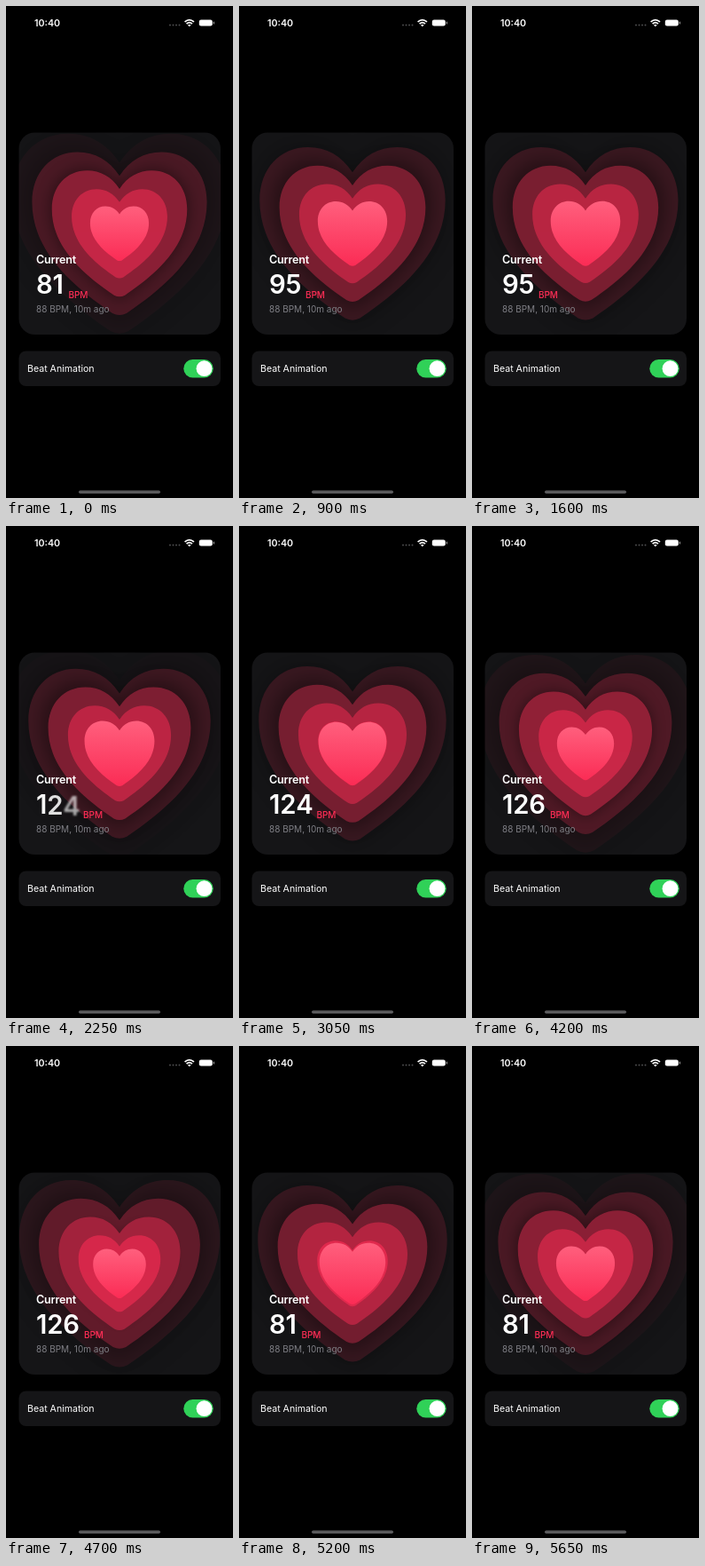
An HTML page for the animation above (5.7 s loop, 256 px wide and 554 px high).

```html
<!DOCTYPE html>
<html lang="en">
<head>
<meta charset="utf-8">
<title>Heart rate</title>
<style>
  html, body { margin: 0; width: 100%; height: 100%; overflow: hidden; background: #000; }
  svg { position: absolute; left: 0; top: 0; }
  text, .num { font-family: Inter, Roboto, sans-serif; fill: #fff; }
  .num { position: absolute; left: 34px; top: 296px; font-size: 29.3px; font-weight: 600;
         line-height: 36px; letter-spacing: -.2px; color: #fff; white-space: nowrap; }
  .num span { display: inline-block; }
</style>
</head>
<body>
<svg width="256" height="554" viewBox="0 0 256 554">
  <defs>
    <path id="heart" d="M0-33C-6-42-14-46.5-24-46.5C-39-46.5-50-35-50-18C-50 8-30 28-4 45.5Q0 47.5 4 45.5C30 28 50 8 50-18C50-35 39-46.5 24-46.5C14-46.5 6-42 0-33Z"/>
    <linearGradient id="pink" x2="0" y2="1">
      <stop stop-color="#ff5f7d"/><stop offset="1" stop-color="#fb2c55"/>
    </linearGradient>
    <filter id="blur" x="-30%" y="-30%" width="160%" height="160%">
      <feGaussianBlur stdDeviation="5"/>
    </filter>
    <clipPath id="card"><rect x="14.5" y="142.5" width="227.5" height="227.5" rx="18"/></clipPath>
  </defs>

  <text x="32" y="23" font-size="10.7" font-weight="600">10:40</text>
  <g fill="#4c4c4e">
    <circle cx="185" cy="21.6" r="1"/><circle cx="188.5" cy="21.6" r="1"/>
    <circle cx="192" cy="21.6" r="1"/><circle cx="195.5" cy="21.6" r="1"/>
  </g>
  <g fill="none" stroke="#fff" stroke-width="1.7">
    <path d="M201.6 17.9Q206.8 13.2 212 17.9M203.6 20Q206.8 17.2 210 20"/>
    <path d="M205 21.4Q206.8 20 208.6 21.4L206.8 23.2Z" fill="#fff" stroke="none"/>
  </g>
  <rect x="217.8" y="15.5" width="15" height="7" rx="2.2" fill="#fff"/>
  <rect x="233.8" y="17.6" width="1.2" height="2.8" rx=".6" fill="#999"/>

  <g fill="#151517">
    <rect x="14.5" y="142.5" width="227.5" height="227.5" rx="18"/>
    <rect x="14.5" y="388.5" width="227.5" height="39.5" rx="8"/>
  </g>
  <g clip-path="url(#card)">
    <g id="rings"></g>
    <use id="core" href="#heart" fill="url(#pink)"/>
  </g>

  <text x="34" y="290" font-size="12.6" font-weight="600" letter-spacing="-.2">Current</text>
  <text id="bpm" y="329" font-size="10" font-weight="500" letter-spacing="-.1" style="fill:#ff2d55">BPM</text>
  <text x="34" y="345" font-size="10" style="fill:#7f7f85">88 BPM, 10m ago</text>

  <text x="24" y="412" font-size="10.6">Beat Animation</text>
  <rect x="200.3" y="398" width="33.4" height="20.4" rx="10.2" fill="#30d158"/>
  <circle cx="223.5" cy="408.2" r="8.9" fill="#fff"/>
  <rect x="82" y="545.5" width="92" height="3.4" rx="1.7" fill="#5a5a5c"/>
</svg>
<div class="num" id="old"></div>
<div class="num" id="now"></div>

<script>
const $ = id => document.getElementById(id);
const LOOP = 5.7, BEAT = 5.65 / 8, LIFE = 3, WIDTH = 63.2;
const values = ['81', '95', '124', '126', '81'];
const bpmX = [70.5, 75, 87.5, 88, 70.5];
const clamp = x => Math.max(0, Math.min(1, x));
const easeOut = x => 1 - (1 - clamp(x)) ** 3;
const place = width => `translate(128 256.3) scale(${width / 100})`;

// Oldest ring first, so that newer ones lie on top
const COUNT = 5;
$('rings').innerHTML = `<g><g><use href="#heart" filter="url(#blur)"/></g>
  <use href="#heart" fill="#fa2d55"/></g>`.repeat(COUNT);
const rings = [...$('rings').children];

function drawHearts(t) {
  const phase = t % BEAT;
  rings.forEach((ring, i) => {
    const age = phase + (COUNT - 1 - i) * BEAT;
    ring.style.display = age < LIFE ? '' : 'none';
    ring.setAttribute('transform', place(WIDTH * (1 + age)));
    ring.setAttribute('opacity', Math.max(0, .7 * (1 - age / LIFE)));
    ring.firstElementChild.setAttribute('transform', `scale(${1.1 * clamp(age / 1.5)})`);
  });

  // One damped swing per beat
  const swing = Math.exp(-1.8 * phase) * Math.sin(2 * Math.PI * phase / BEAT);
  $('core').setAttribute('transform', place(66 + 17.7 * swing));
}

function setDigits(box, value) {
  if (box.textContent !== value)
    box.innerHTML = [...value].map(d => `<span>${d}</span>`).join('');
}

function styleDigit(el, opacity, shift, blur) {
  el.style.opacity = opacity;
  el.style.transform = `translateY(${shift}px)`;
  el.style.filter = blur > .05 ? `blur(${blur}px)` : 'none';
}

function drawNumber(t) {
  // The reading changes on every second beat, a touch early
  const clock = t + .04;
  const step = Math.min(4, Math.floor((clock / BEAT + 1) / 2));
  const age = step ? clock - (2 * step - 1) * BEAT : 9;
  const last = Math.max(0, step - 1);
  const value = values[step], prev = values[last];
  setDigits($('now'), value);
  setDigits($('old'), prev);

  let order = 0;
  for (let i = 0; i < 3; i++) {
    const fresh = $('now').children[i], stale = $('old').children[i];
    const same = value[i] === prev[i];
    const e = same ? 1 : easeOut((age - .05 * order++) / .25);
    if (fresh) styleDigit(fresh, e, 5 * (1 - e), 2.5 * (1 - e));
    if (stale) styleDigit(stale, (1 - e) ** 2, -10 * e, 4 * e);
  }
  $('bpm').setAttribute('x', bpmX[last] + (bpmX[step] - bpmX[last]) * easeOut(age / .25));
}

const start = performance.now();
function frame() {
  const t = (performance.now() - start) / 1000 % LOOP;
  drawHearts(t);
  drawNumber(t);
  requestAnimationFrame(frame);
}
frame();
</script>
</body>
</html>
```
